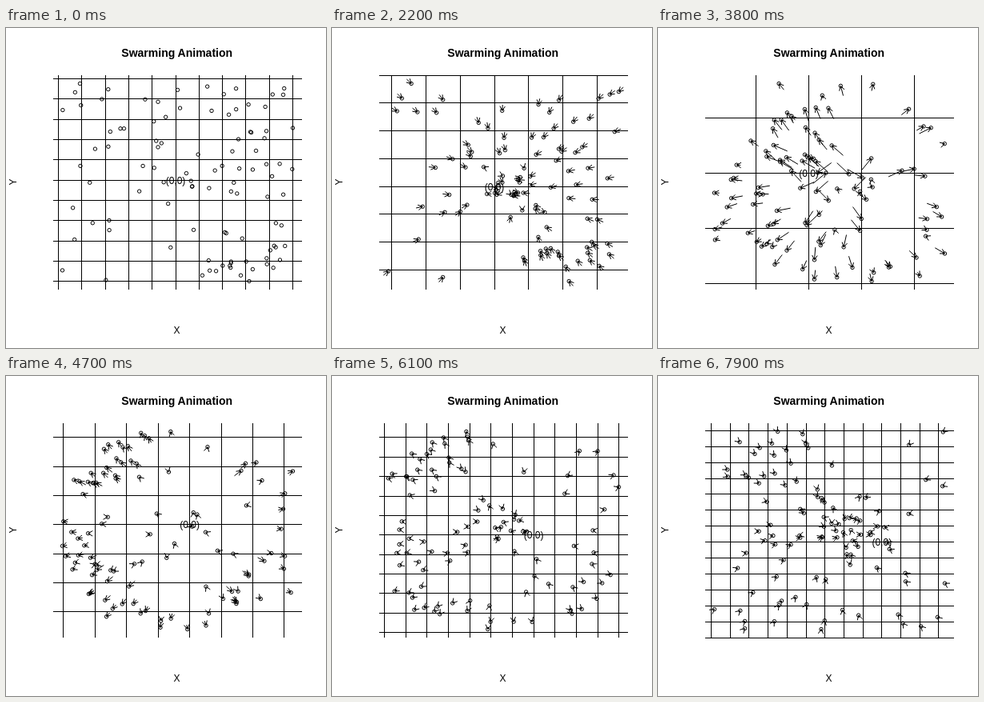
Animation of 400 by 400 pixels, one loop 8000 ms. Source, as an HTML page:

```html
<!DOCTYPE html>
<html lang="en">
<head>
<meta charset="utf-8">
<title>Swarming Animation</title>
<style>
  html, body { margin: 0; width: 100%; height: 100%; overflow: hidden; background: #fff; }
  svg { display: block; width: 100%; height: 100%; }
  text { font-family: "Liberation Sans", Arial, sans-serif; font-size: 12px; text-anchor: middle; }
  .title { font-size: 14px; font-weight: bold; }
  path { fill: none; stroke: #000; stroke-width: 1; }
  #grid { shape-rendering: crispEdges; }
</style>
</head>
<body>
<svg viewBox="0 0 400 400">
  <path id="grid"/>
  <path id="dots"/>
  <path id="arrows"/>
  <text id="origin">(0,0)</text>
  <text class="title" x="213.7" y="36">Swarming Animation</text>
  <text x="213.5" y="382">X</text>
  <text transform="translate(13 192.5) rotate(-90)">Y</text>
</svg>
<script>
const STEPS = 80, STEP_MS = 100, COUNT = 100;
const PLOT = { left: 59, right: 370, top: 59, bottom: 327 };
const BOX = { left: 70.5, right: 358.5, top: 69.5, bottom: 316.5 };
const FIELD = 9.9, GOAL_SPREAD = 1;
const PULL = 0.009, SOFT = 0.05;
const RADIUS = 2.2, BARB = 6.5, BARB_ANGLE = Math.PI / 6;

// Key views of the plane; the motion between them is eased.
const VIEWS = [
  { step: 0, x: 212, y: 190.2, gapX: 29.3, gapY: 25.35 },
  { step: 10, x: 212, y: 192.4, gapX: 31.7, gapY: 26.75 },
  { step: 22, x: 203, y: 198, gapX: 42.8, gapY: 34.7 },
  { step: 33, x: 193, y: 186, gapX: 69, gapY: 63 },
  { step: 38, x: 188.5, y: 181.6, gapX: 66, gapY: 68.8 },
  { step: 47, x: 229.6, y: 185.75, gapX: 39.42, gapY: 36.3 },
  { step: 61, x: 252.1, y: 198.8, gapX: 26.65, gapY: 24.38 },
  { step: 79, x: 279.8, y: 207.6, gapX: 23.7, gapY: 19.9 }
];

let seed = 7;
function spread(width) {
  seed = (seed * 16807) % 2147483647;
  return (seed / 2147483647 - 0.5) * width;
}

const makeMember = () => ({
  x: spread(FIELD), y: spread(FIELD), vx: 0, vy: 0,
  goalX: spread(GOAL_SPREAD), goalY: spread(GOAL_SPREAD)
});

// Constant pull towards each member's own goal near the centre.
function advance(p) {
  const dx = p.goalX - p.x, dy = p.goalY - p.y;
  const pull = PULL / (Math.hypot(dx, dy) + SOFT);
  p.x += p.vx + dx * pull / 2;
  p.y += p.vy + dy * pull / 2;
  p.vx += dx * pull;
  p.vy += dy * pull;
}

function simulate() {
  const swarm = Array.from({ length: COUNT }, makeMember);
  return Array.from({ length: STEPS }, () => {
    const places = swarm.map(({ x, y }) => ({ x, y }));
    swarm.forEach(advance);
    return places;
  });
}

// Smooth curve through the key views.
function viewAt(step) {
  let i = 0;
  while (i < VIEWS.length - 2 && step > VIEWS[i + 1].step) i++;
  const a = VIEWS[i], b = VIEWS[i + 1];
  const before = VIEWS[Math.max(i - 1, 0)], after = VIEWS[Math.min(i + 2, VIEWS.length - 1)];
  const span = b.step - a.step, u = (step - a.step) / span;
  const ease = key => {
    const slope = (p, q) => (q[key] - p[key]) / (q.step - p.step) * span;
    const m0 = slope(before, b), m1 = slope(a, after), rise = b[key] - a[key];
    return a[key] + u * (m0 + u * (3 * rise - 2 * m0 - m1 + u * (m0 + m1 - 2 * rise)));
  };
  return { x: ease("x"), y: ease("y"), gapX: ease("gapX"), gapY: ease("gapY") };
}

// Map the range of values onto the range from low to high.
function fit(values, low, high) {
  const min = Math.min(...values), max = Math.max(...values);
  return v => low + (v - min) / (max - min) * (high - low);
}

function gridLines(origin, gap, low, high, line) {
  let d = "";
  for (let k = Math.ceil((low - origin) / gap); origin + k * gap <= high; k++) {
    d += line(Math.floor(origin + k * gap) + 0.5);
  }
  return d;
}

const segment = (x1, y1, x2, y2) =>
  `M${x1.toFixed(2)} ${y1.toFixed(2)}L${x2.toFixed(2)} ${y2.toFixed(2)}`;

function circle({ x, y }) {
  const arc = `a${RADIUS} ${RADIUS} 0 1 0 `;
  return `M${x - RADIUS} ${y}${arc}${2 * RADIUS} 0${arc}${-2 * RADIUS} 0`;
}

function arrow(tip, tail) {
  const angle = Math.atan2(tail.y - tip.y, tail.x - tip.x);
  const barb = turn => segment(tip.x, tip.y,
    tip.x + BARB * Math.cos(angle + turn), tip.y + BARB * Math.sin(angle + turn));
  return segment(tail.x, tail.y, tip.x, tip.y) + barb(BARB_ANGLE) + barb(-BARB_ANGLE);
}

const history = simulate();
const byId = id => document.getElementById(id);
const setPath = (id, d) => byId(id).setAttribute("d", d);

function draw(step) {
  const view = viewAt(step);
  setPath("grid",
    gridLines(view.x, view.gapX, PLOT.left, PLOT.right, x => segment(x, PLOT.top, x, PLOT.bottom)) +
    gridLines(view.y, view.gapY, PLOT.top, PLOT.bottom, y => segment(PLOT.left, y, PLOT.right, y)));
  byId("origin").setAttribute("x", view.x);
  byId("origin").setAttribute("y", view.y + 4.5);

  const now = history[step];
  const mapX = fit(now.map(p => p.x), BOX.left, BOX.right);
  const mapY = fit(now.map(p => p.y), BOX.top, BOX.bottom);
  const place = p => ({ x: mapX(p.x), y: mapY(p.y) });
  const tips = now.map(place);
  const tails = step ? history[step - 1].map(place) : [];
  setPath("dots", tips.map(circle).join(""));
  setPath("arrows", tails.map((tail, i) => arrow(tips[i], tail)).join(""));
}

const begin = performance.now();
let shown = -1;
function tick() {
  const step = Math.floor((performance.now() - begin) / STEP_MS) % STEPS;
  if (step !== shown) draw(shown = step);
  requestAnimationFrame(tick);
}
tick();
</script>
</body>
</html>
```
